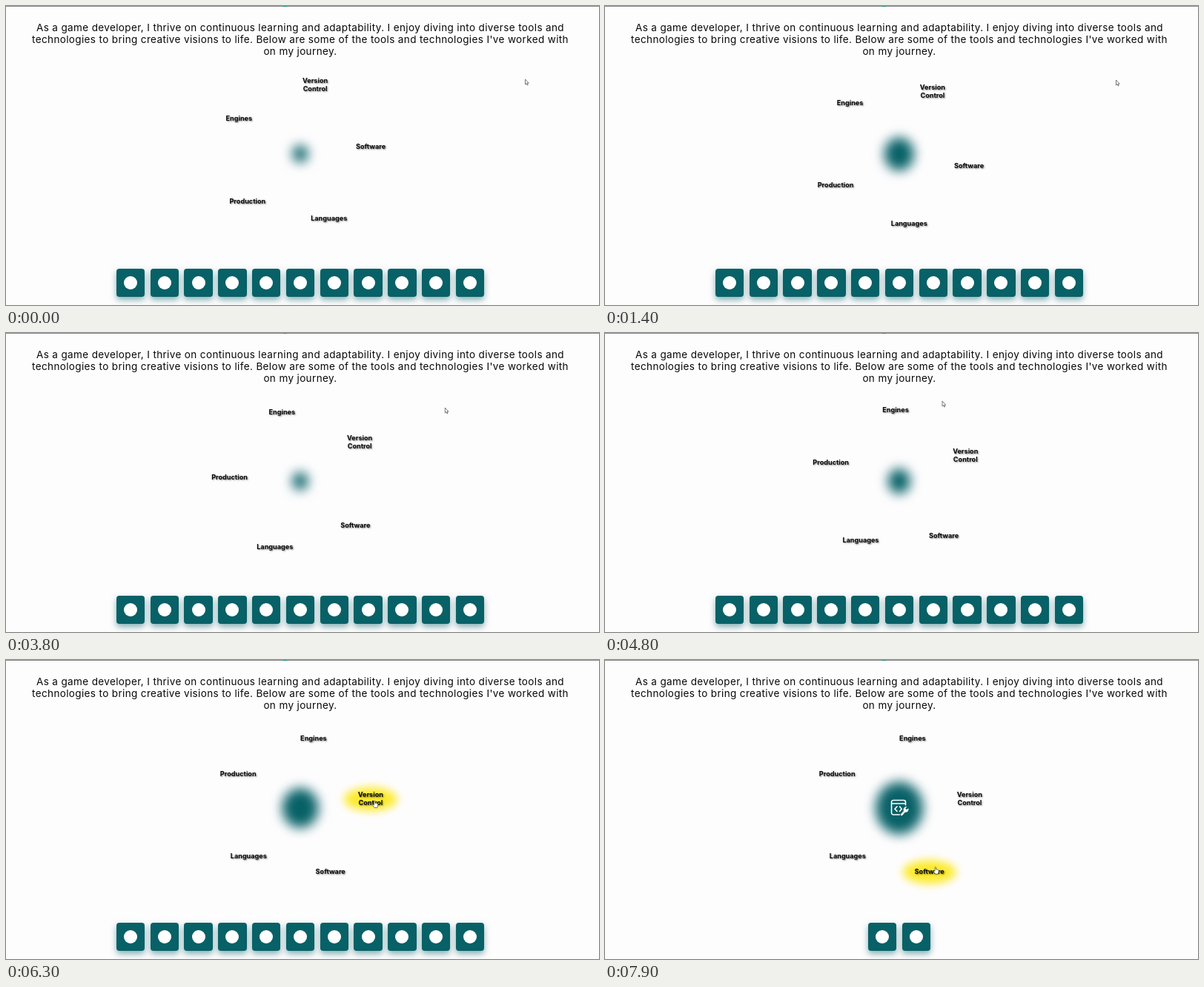
Write an HTML page that moves like this. It is 800 px wide and 404 px high and loops after 8 s.

```html
<!DOCTYPE html>
<html lang="en">
<head>
<meta charset="utf-8">
<title>Tools and technologies</title>
<style>
html, body { margin: 0; width: 100%; height: 100%; overflow: hidden; background: #fefdfe; }
#stage { position: relative; width: 800px; height: 404px; overflow: hidden; background: #fefdfe; font-family: Inter, "Open Sans", sans-serif; color: #080808; }
#stage > * { position: absolute; }
#edge { left: 0; top: 0; width: 800px; height: 1px; background: #85888a; }
#edge i { position: absolute; left: 374px; width: 5px; height: 1px; background: #14937f; }
#intro { left: 0; top: 20.6px; width: 794px; margin: 0; text-align: center; font-size: 13.5px; line-height: 16.2px; letter-spacing: .37px; white-space: nowrap; }
#blob { left: 397px; top: 200px; border-radius: 50%; background: #086167; filter: blur(8px); transform: translate(-50%, -50%); }
#tool { left: 385px; top: 188px; }
.label, .glow { left: 0; top: 0; }
.label { font-size: 9.1px; line-height: 10.6px; font-weight: 700; text-align: center; white-space: pre; text-shadow: 1px 1px 2px rgba(0, 0, 0, .5); }
.glow { width: 72px; height: 32px; border-radius: 50%; background: #fcea2c; filter: blur(6px); }
.tile { top: 354.7px; width: 38.5px; height: 38.5px; border-radius: 4px; background: #086167; box-shadow: 0 4px 8px rgba(8, 97, 103, .5); }
.tile i { position: absolute; left: 10.25px; top: 10.25px; width: 18px; height: 18px; border-radius: 50%; background: #fff; }
.cursor { left: 0; top: 0; overflow: visible; }
</style>
</head>
<body>
<div id="stage">
  <div id="edge"><i></i></div>
  <p id="intro">As a game developer, I thrive on continuous learning and adaptability. I enjoy diving into diverse tools and<br>technologies to bring creative visions to life. Below are some of the tools and technologies I've worked with<br>on my journey.</p>
  <div id="blob"></div>
  <svg id="tool" width="26" height="25" fill="none" stroke="#fff" stroke-width="1.6" stroke-linecap="round" stroke-linejoin="round">
    <path d="M12.500 21H4a2.500 2.500 0 0 1-2.500-2.500V4A2.500 2.500 0 0 1 4 1.500H18A2.500 2.500 0 0 1 20.500 4V8M1.500 6H20.500"/>
    <path d="M9 10L6 13.200L9 16.400M12.500 10L15.200 13.200L12.500 16.400"/>
    <path fill="#fff" stroke="none" d="M14 20.200l4-4.300a4.100 4.100 0 0 1 4.400-5.800l-2.100 2.400 1.400 1.700 2.600-1.700a4.100 4.100 0 0 1-4.600 5.300l-3.600 4.300a1.500 1.500 0 0 1-2.100-1.900z"/>
  </svg>
</div>
<script>
const LOOP = 8000, CX = 397, CY = 200, ORBIT = 95.6;
const stage = document.getElementById("stage");
const blob = document.getElementById("blob");
const tool = document.getElementById("tool");

// Rows of [ms, value, ...], interpolated linearly.
const ANGLE = [[0, -5.9], [1400, 10], [2600, 24.3], [3800, 39], [4800, 51], [5970, 64.8]];
const POINTER = [
  [0, 700.5, 99], [1400, 689.5, 100], [2600, 706.5, 98], [3000, 700, 99], [3800, 592.5, 101],
  [4400, 490, 94], [4800, 455, 92], [5300, 466, 120], [5950, 496, 184], [6300, 497.5, 190],
  [7250, 497.5, 190], [7650, 450, 277], [7900, 446, 279.5]
];
const GLOWS = {
  "Version\nControl": [[5950, 0], [6200, 1], [7350, 1], [7600, 0]],
  "Software": [[7550, 0], [7800, 1]]
};
const GROW = [[5950, 0], [6300, .2], [6700, 1]];
const ICON = [[7550, 0], [7800, 1]];
const HOVER = 5950, FILTER = 6500;

function at(rows, t) {
  const next = rows.findIndex(r => r[0] > t);
  if (next === 0) return rows[0].slice(1);
  if (next < 0) return rows[rows.length - 1].slice(1);
  const a = rows[next - 1], b = rows[next];
  const k = (t - a[0]) / (b[0] - a[0]);
  return a.slice(1).map((v, i) => v + (b[i + 1] - v) * k);
}

function add(cls, html = "") {
  const el = document.createElement("div");
  el.className = cls;
  el.innerHTML = html;
  stage.append(el);
  return el;
}

const labels = ["Software", "Languages", "Production", "Engines", "Version\nControl"].map((name, i) => {
  const glow = GLOWS[name] && add("glow");
  return { turn: i * 72, rows: GLOWS[name], glow, el: add("label", name) };
});

const tiles = Array.from({ length: 11 }, () => add("tile", "<i></i>"));

function addCursor(path) {
  stage.insertAdjacentHTML("beforeend",
    `<svg class="cursor" width="10" height="11"><path d="${path}" fill="#fff" stroke="#444" stroke-width=".7" stroke-linejoin="round"/></svg>`);
  return stage.lastElementChild;
}
const arrow = addCursor("M0 0V7L1.600 5.600L2.700 8L3.700 7.500L2.700 5.200H4.700Z");
const hand = addCursor("M-1 .600Q-.200-.400 .600 .600V3.600L1.400 3.200L2.300 3.700L3.200 3.700L4.200 4.500V7L3.300 9.600H-.500L-2.800 6.200Q-3.200 5-2.100 5.200L-1 6Z");

function place(el, x, y) {
  el.style.transform = `translate(${x}px, ${y}px) translate(-50%, -50%)`;
}

function layTiles(count) {
  tiles.forEach((tile, i) => {
    tile.style.visibility = i < count ? "visible" : "hidden";
    tile.style.left = CX - 19.25 + (i - (count - 1) / 2) * 45.8 + "px";
  });
}

function draw(t) {
  const [angle] = at(ANGLE, t);
  for (const { turn, rows, glow, el } of labels) {
    const a = (angle + turn) * Math.PI / 180;
    const x = CX + ORBIT * Math.cos(a), y = CY + ORBIT * Math.sin(a);
    place(el, x, y);
    if (glow) {
      place(glow, x, y);
      glow.style.opacity = at(rows, t)[0];
    }
  }

  const pulse = 10.5 + 6 * (1 - Math.cos(Math.min(t, HOVER) / 3950 * 2 * Math.PI));
  const r = pulse + (32 - pulse) * at(GROW, t)[0];
  blob.style.width = 2 * r + "px";
  blob.style.height = 2.22 * r + "px";
  tool.style.opacity = at(ICON, t)[0];

  layTiles(t < FILTER ? 11 : 2);

  const [px, py] = at(POINTER, t);
  const pointing = t >= HOVER && (t < 7350 || t >= 7550);
  for (const c of [arrow, hand]) c.style.transform = `translate(${px}px, ${py}px)`;
  arrow.style.visibility = pointing ? "hidden" : "visible";
  hand.style.visibility = pointing ? "visible" : "hidden";
}

const start = performance.now();
function tick() {
  draw((performance.now() - start) % LOOP);
  requestAnimationFrame(tick);
}
tick();
</script>
</body>
</html>
```
